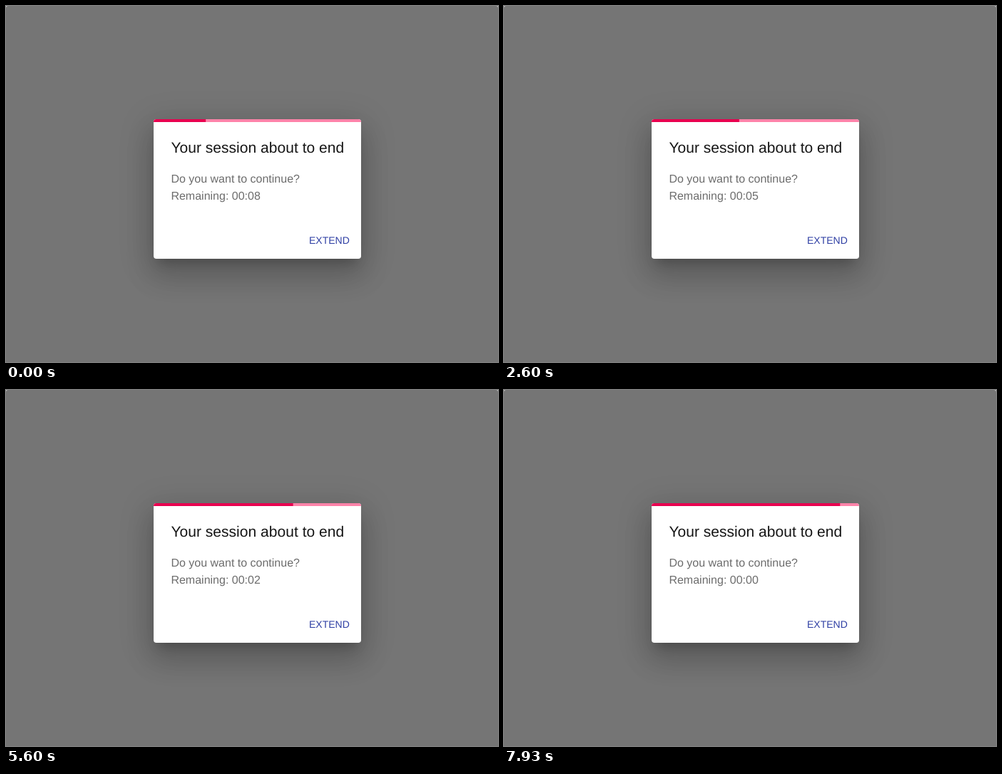
An HTML page that plays this animation: 690x500 px, repeating every 8 s.

```html
<!DOCTYPE html>
<html lang="en">
<head>
<meta charset="utf-8">
<title>Session timeout</title>
<style>
  html, body { margin: 0; width: 100%; height: 100%; overflow: hidden; background: #ccc; }
  .backdrop { position: absolute; inset: 0; background: #757575; border-radius: 3px 3px 0 0; }
  .dialog {
    position: absolute; left: 207px; top: 159px; width: 291px; height: 196px;
    overflow: hidden; border-radius: 4px; background: #fff;
    box-shadow: 0 11px 15px -7px rgba(0, 0, 0, .2),
                0 24px 38px 3px rgba(0, 0, 0, .14),
                0 9px 46px 8px rgba(0, 0, 0, .12);
  }
  svg { display: block; }
  text {
    font: 16px "Liberation Sans", Arial, sans-serif;
    fill: #6c6c6c; text-rendering: geometricPrecision; white-space: pre;
  }
  .title { font-size: 21px; letter-spacing: .03px; fill: #151515; }
  .button { font-size: 14px; fill: #3040a4; }
</style>
</head>
<body>
<div class="backdrop"></div>
<div class="dialog">
  <svg width="291" height="196" viewBox="207 159 291 196">
    <rect x="207" y="159" width="291" height="4" fill="#ff83a9"/>
    <rect id="bar" x="207" y="159" height="4" fill="#e8004f"/>
    <text class="title" x="231.4" y="206">Your session about to end</text>
    <text x="231.4" y="248">Do you want to continue?</text>
    <text id="remaining" x="231.4" y="272"></text>
    <text class="button" x="425" y="334">EXTEND</text>
  </svg>
</div>
<script>
  const LOOP = 8000, FPS = 15;
  const FIRST_TICK = 580, TRANSITION = 400;
  const START_SECONDS = 8, START_WIDTH = 73.15, STEP_WIDTH = 291 / 12;
  const bar = document.getElementById('bar');
  const remaining = document.getElementById('remaining');

  function draw(now) {
    // Hold each picture for one fifteenth of a second; 4 ms absorbs timestamp rounding.
    const time = Math.floor((now % LOOP + 4) * FPS / 1000) * 1000 / FPS;
    const elapsed = time - FIRST_TICK;
    const ticks = Math.floor(elapsed / 1000);
    const progress = Math.min(1, (elapsed - ticks * 1000) / TRANSITION);
    const steps = ticks < 0 ? 0 : ticks + progress;
    const seconds = Math.max(0, START_SECONDS - ticks - 1);

    bar.setAttribute('width', START_WIDTH + steps * STEP_WIDTH);
    remaining.textContent = `Remaining: 00:0${seconds}`;
  }

  function loop() {
    draw(performance.now());
    requestAnimationFrame(loop);
  }
  loop();
</script>
</body>
</html>
```
